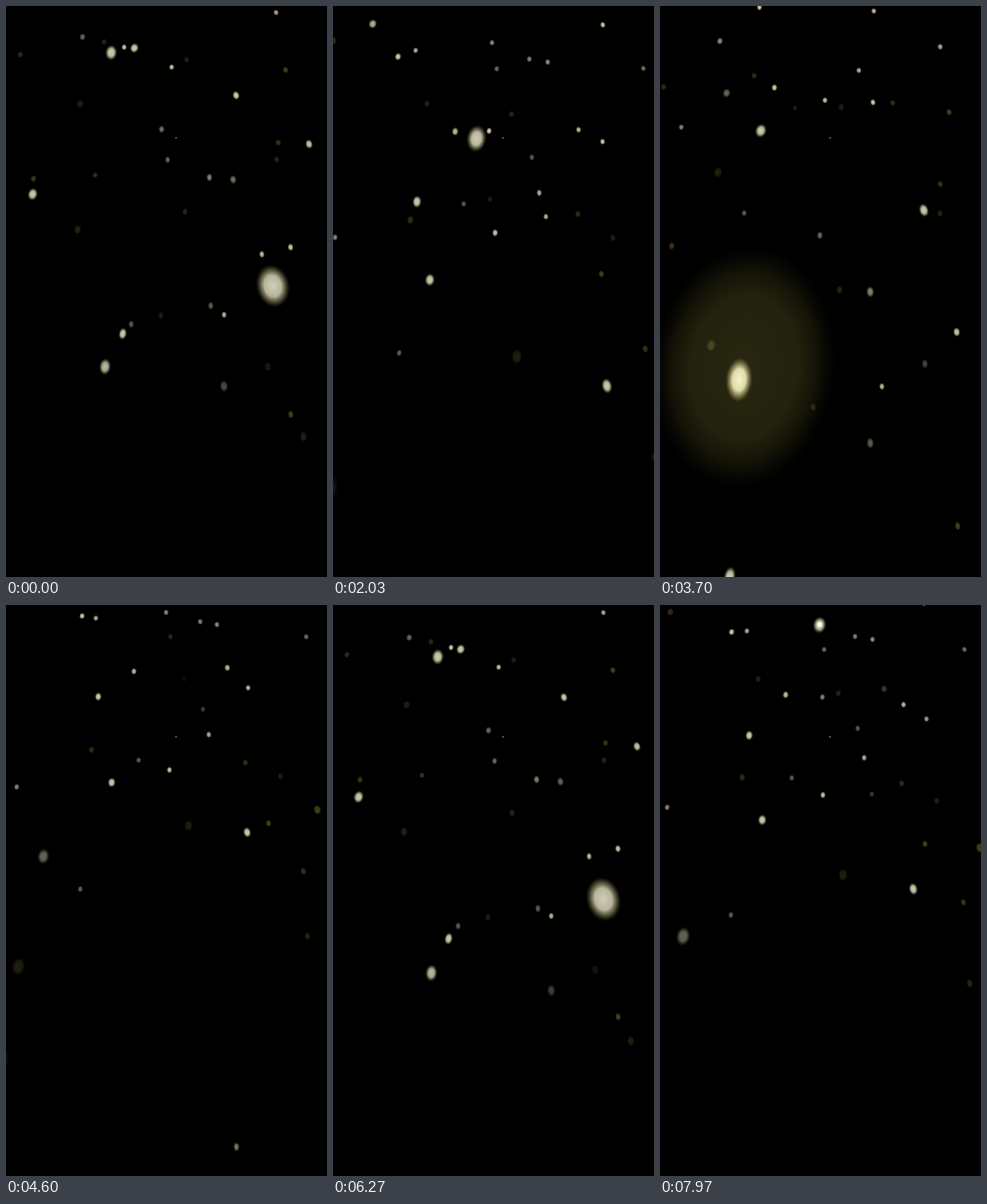
An HTML page with a canvas for the animation above (8 s loop, 360 by 640 pixels).

```html
<!DOCTYPE html>
<html lang="en">
<head>
<meta charset="utf-8">
<title>Fireflies</title>
<style>
  html, body { margin: 0; width: 100%; height: 100%; overflow: hidden; background: #000; }
  canvas { display: block; width: 100%; height: 100%; }
</style>
</head>
<body>
<canvas id="stage" width="360" height="640"></canvas>
<script>
const ctx = document.getElementById('stage').getContext('2d');
const LOOP = 8000, CYCLE = 3125, HORIZON = -250, CENTER = 195;

// A fly passes (x, y) at a moment of the cycle, `depth` seconds before it reaches the viewer.
const nearFlies = [
  { at: 575, x: 95, y: 400, depth: 0.136, slope: -0.125, size: 1.25 },
  { at: 0, x: 118, y: 52, depth: 1.05, slope: -0.08, size: 0.65 },
  { at: 0, x: 299, y: 313, depth: 0.73, slope: 0.257, size: 1.25 },
  { at: 0, x: 144, y: 47, depth: 2.42, slope: -0.333, size: 1.1 },
  { at: 0, x: 258, y: 100, depth: 2.14, slope: 0.294, size: 0.8 },
  { at: 0, x: 131, y: 367, depth: 1.88, slope: -0.194, size: 0.8 },
  { at: 1720, x: 100, y: 146, depth: 1.99, slope: -0.08, size: 0.8 },
  { at: 1720, x: 284, y: 318, depth: 1.95, slope: 0.215, size: 0.9 },
  { at: 2030, x: 161, y: 148, depth: 0.67, slope: -0.143, size: 0.68 }
].map(f => ({ ...f, light: 0.9 }));

let seed = 7;
const random = () => (seed = (seed * 16807) % 2147483647) / 2147483647;
const between = (a, b) => a + (b - a) * random();

function farFly() {
  const x = between(0, 360), y = -170 + 560 * random() ** 1.5;
  return {
    x, y,
    at: between(0, CYCLE),
    depth: between(2.4, 5.5),
    slope: (x - CENTER) / (y - HORIZON) * between(0.4, 0.8),
    size: between(0.8, 1.2),
    light: 0.15 + 0.75 * random() ** 1.6
  };
}
const flies = [...nearFlies, ...Array.from({ length: 58 }, farFly)];

function glow(...stops) {
  const g = ctx.createRadialGradient(0, 0, 0, 0, 0, 1);
  for (const [at, color] of stops) g.addColorStop(at, color);
  return g;
}
const spark = glow([0, 'rgb(232,230,206)'], [0.5, 'rgba(220,217,185,.92)'],
  [0.75, 'rgba(175,171,125,.5)'], [1, 'rgba(110,106,60,0)']);
const halo = glow([0, 'rgb(205,199,90)'], [0.6, 'rgba(200,193,75,.9)'],
  [0.8, 'rgba(180,174,65,.55)'], [1, 'rgba(120,115,40,0)']);

const clamp = v => Math.max(0, Math.min(1, v));
const wrap = v => ((v % CYCLE) + CYCLE) % CYCLE - CYCLE / 2;

function drawFly(f, phase) {
  const offset = wrap(phase - f.at + CYCLE / 2);
  const depth = f.depth - offset / 1000;
  if (depth < 0.03) return;

  const fall = (f.y - HORIZON) * f.depth / depth;
  const y = HORIZON + fall, x = f.x + (y - f.y) * f.slope;
  const r = Math.max(3.2, 11 * f.size / depth);
  const blur = 0.007 * fall / depth;
  if (y < -r - blur || y > 640 + r + blur) return;

  const fade = clamp((CYCLE / 2 - Math.abs(offset)) / 250);
  ctx.save();
  ctx.translate(x, y);
  ctx.rotate(-Math.atan(f.slope));
  ctx.scale(r, r + blur);
  ctx.globalAlpha = f.light * fade * Math.min(1, 22 / r);
  ctx.fillStyle = r > 40 || f.light < 0.35 ? halo : spark;
  ctx.beginPath();
  ctx.arc(0, 0, 1, 0, Math.PI * 2);
  ctx.fill();
  ctx.restore();
}

function draw(time) {
  ctx.globalCompositeOperation = 'source-over';
  ctx.globalAlpha = 1;
  ctx.fillStyle = '#000';
  ctx.fillRect(0, 0, 360, 640);
  ctx.globalCompositeOperation = 'lighter';
  for (const f of flies) drawFly(f, time % LOOP % CYCLE);
  // One still speck
  ctx.fillStyle = '#8a8440';
  ctx.fillRect(190, 147, 1.5, 1.5);
}

const start = performance.now();
function tick() {
  draw(performance.now() - start);
  requestAnimationFrame(tick);
}
tick();
</script>
</body>
</html>
```
